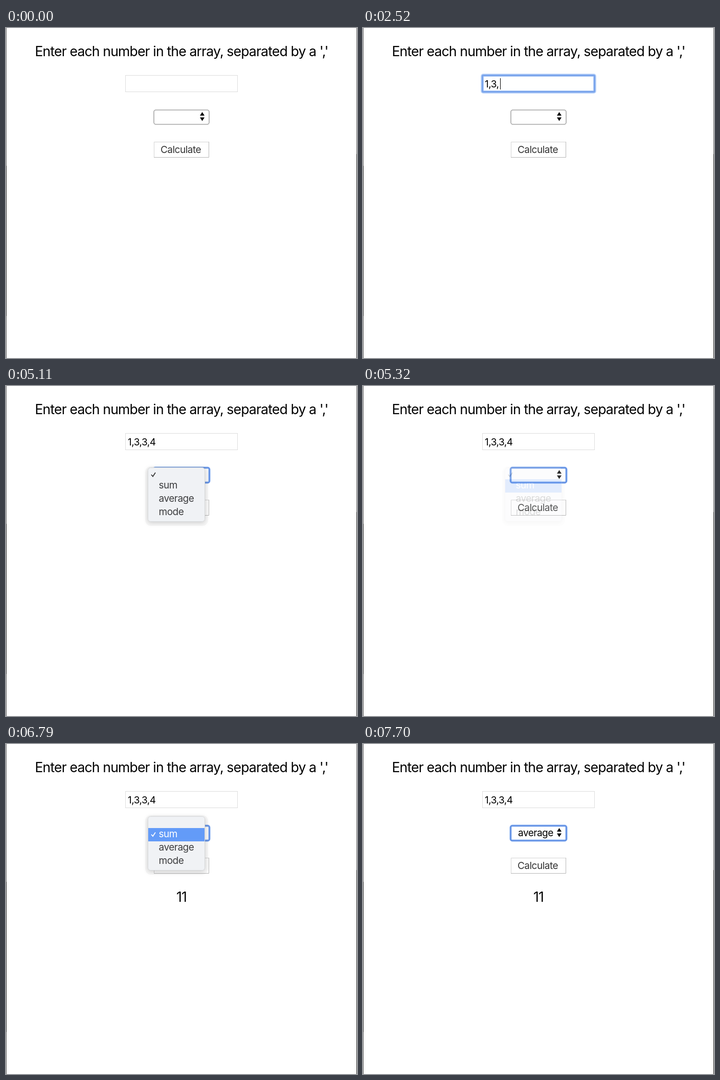
Write an HTML page that moves like this. It is 686 px wide and 644 px high and loops after 8000 ms.

```html
<!DOCTYPE html>
<html lang="en">
<head>
<meta charset="utf-8">
<title>Array calculator</title>
<style>
  html, body { margin: 0; width: 100%; height: 100%; overflow: hidden; background: #fff; }
  svg { display: block; }
  text {
    font: 19px Inter, "Liberation Sans", sans-serif;
    font-optical-sizing: none;
    letter-spacing: -.027em;
  }
  .big { font-size: 26.6px; letter-spacing: -.032em; text-anchor: middle; }
  .label { fill: #333; }
  .line { fill: none; stroke: #ccc; }
  .glow { fill: none; stroke: #c3d9fa; stroke-width: 6; }
  .ring { fill: none; stroke: #7ba5ec; stroke-width: 3.4; }
  #selectFocus .ring { stroke: #5f8ee3; stroke-width: 2.6; }
  #selectFocus .glow { stroke-width: 5; }
  #buttonFocus .ring { stroke: #88aef0; stroke-width: 4; }
  #panel { filter: drop-shadow(0 2px 4px rgba(0, 0, 0, .16)); }
</style>
</head>
<body>
<svg width="686" height="644" viewBox="0 0 686 644">
  <path d="M.5 0V269M685.5 0V246" stroke="#666"/>
  <path d="M.5 269V562M685.5 246V644" stroke="#222"/>
  <path d="M.5 562V644" stroke="#555"/>

  <text class="big" x="343" y="55">Enter each number in the array, separated by a ','</text>

  <rect class="line" x="233.5" y="92.5" width="219" height="32" style="stroke:#ddd"/>
  <g id="inputFocus">
    <rect class="glow" x="233" y="92" width="220" height="33" rx="2"/>
    <rect class="ring" x="233.5" y="92.5" width="219" height="32" rx="1.5"/>
  </g>
  <text id="typed" x="238" y="116"></text>
  <path id="caret" d="M0 98V120" stroke="#000"/>

  <rect x="289" y="160" width="108" height="28" rx="4" fill="#fff" stroke="#a6a6a6" stroke-width="1.6"/>
  <g id="selectFocus">
    <rect class="glow" x="288.5" y="159.5" width="109" height="29" rx="4"/>
    <rect class="ring" x="288.5" y="159.5" width="109" height="29" rx="3"/>
  </g>
  <text id="value" x="303" y="180"></text>
  <path d="M379 171L383.5 164L388 171ZM379 174.5H388L383.5 181.5Z"/>

  <g id="buttonFocus">
    <rect class="glow" x="287.5" y="220.5" width="111" height="34" rx="4"/>
    <rect class="ring" x="287.5" y="220.5" width="111" height="34" rx="2"/>
  </g>
  <path id="edgeTop" class="line" d="M289.5 252V222.5H396"/>
  <path id="edgeBottom" class="line" d="M289 252.5H396.5V222"/>
  <text class="label" x="302" y="244">Calculate</text>

  <text id="result" class="big" x="343" y="308">11</text>

  <g id="menu">
    <g id="panel">
      <rect x="272" y="157" width="123" height="116" rx="11" fill="#000" opacity=".035"/>
      <rect x="277.5" y="159.5" width="111" height="105" rx="5" fill="#f0f2f5" stroke="#d6d8da"/>
    </g>
    <rect id="hover" x="278" width="110" fill="#639bf8"/>
    <path id="check" d="M284 173L287 176.5L292 169" fill="none" stroke-width="1.7"/>
    <text class="item" x="298.5" y="200">sum</text>
    <text class="item" x="298.5" y="226">average</text>
    <text class="item" x="298.5" y="252">mode</text>
  </g>
</svg>
<script>
const LOOP = 8000, STEP = 70;
const $ = id => document.getElementById(id);
const show = (id, on) => $(id).style.display = on ? "" : "none";
const set = (id, attrs) => Object.entries(attrs).forEach(([k, v]) => $(id).setAttribute(k, v));
const items = document.querySelectorAll(".item");

// [time, characters typed, caret x or 0 when hidden]
const typing = [
  [0, 0, 0], [770, 0, 239], [1190, 1, 248], [1610, 2, 253], [2100, 2, 0],
  [2380, 3, 264], [2520, 4, 268.5], [3010, 5, 280], [3150, 6, 284],
  [3570, 7, 295.5], [4130, 7, 0]
];

// Row 0 is the blank option
const menus = [
  { open: 4480, move: 4760, pick: 5040, from: 0, to: 1 },
  { open: 6790, move: 7070, pick: 7280, from: 1, to: 2 }
];
const fade = [1, 1, 1, .55, .18];

function drawMenu(t) {
  const m = menus.find(m => t >= m.open && t < m.pick + fade.length * STEP);
  show("menu", m);
  if (!m) return;
  const step = Math.floor((t - m.pick) / STEP);
  const blink = step === 0 || step === 1;
  const row = blink ? -1 : t < m.move ? m.from : m.to;
  set("menu", {
    transform: `translate(0 ${m.from ? -18 : 0})`,
    opacity: step < 0 ? 1 : fade[step]
  });
  show("hover", row >= 0);
  set("hover", row ? { y: 156 + 26 * row, height: 26 } : { y: 163.5, height: 18.5 });
  set("check", {
    transform: `translate(0 ${m.from ? 21.5 : 0})`,
    stroke: row === m.from ? "#fff" : "#333"
  });
  items.forEach((el, i) => el.setAttribute("fill", row === i + 1 ? "#fff" : "#3c3d3f"));
}

function draw(t) {
  const [, count, caret] = typing.findLast(k => t >= k[0]);
  $("typed").textContent = "1,3,3,4".slice(0, count);
  show("caret", caret);
  set("caret", { transform: `translate(${caret} 0)` });

  const buttonOn = t >= 5600 && t < 6790;
  show("inputFocus", t >= 770 && t < 4480);
  show("selectFocus", t >= 4480 && !buttonOn);
  show("buttonFocus", buttonOn);

  const pressed = t >= 5600 && t < 5810;
  $("edgeTop").style.stroke = pressed ? "#aaa" : "#d4d4d4";
  $("edgeBottom").style.stroke = pressed ? "#d4d4d4" : "#b8b8b8";

  $("value").textContent = t < 5390 ? "" : t < 7630 ? "sum" : "average";
  show("result", t >= 5810);
  drawMenu(t);
}

const start = performance.now();
function tick() {
  draw((performance.now() - start) % LOOP);
  requestAnimationFrame(tick);
}
tick();
</script>
</body>
</html>
```
